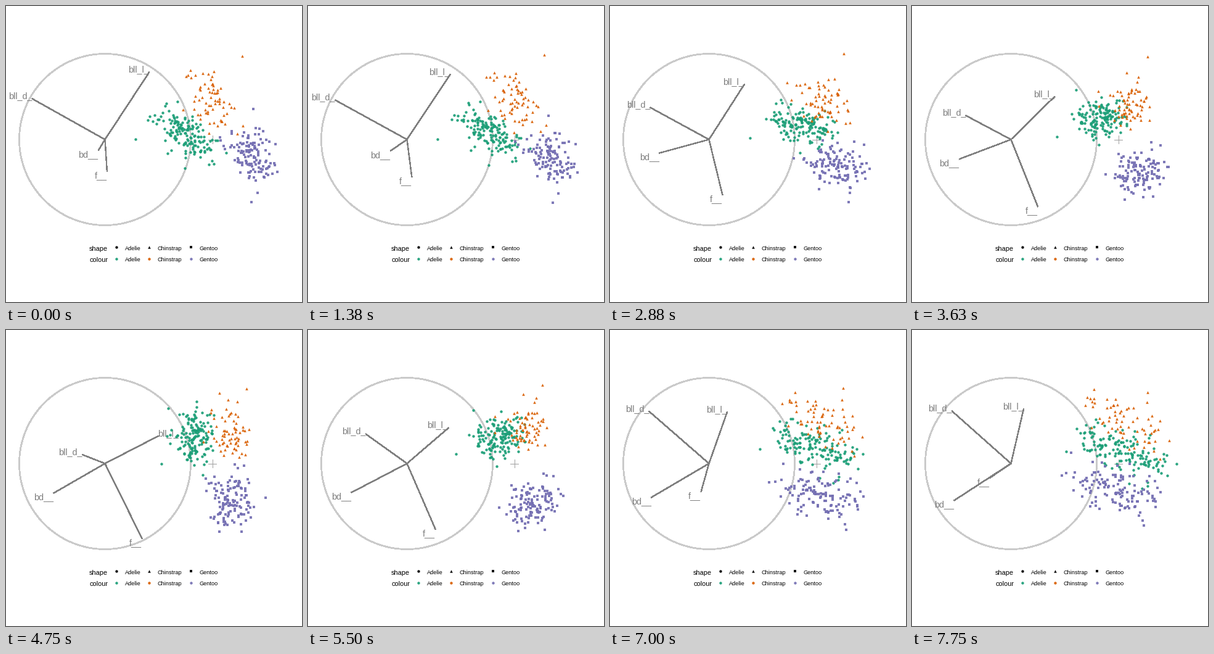
Animation of 480 by 480 pixels, one loop 8000 ms. Source, as a matplotlib script:

```python
import numpy as np
import matplotlib.pyplot as plt
from matplotlib.animation import FuncAnimation

SIZE = 480
INTERVAL = 125
FRAMES = 64
HOLD = 11            # ticks before the tour starts to move
TICKS_PER_STEP = 3

HUB = np.array([160.5, 216.5])
RADIUS = 139
TIP_RADIUS = 138.3
CLOUD = np.array([338.0, 209.2])
CLOUD_SCALE = 221
GREY = "#7f7f7f"

# Variables: bill length, bill depth, flipper length, body mass
LABELS = ["bll_l_", "bll_d_", "f__", "bd__"]
RANGE = np.array([27.5, 8.4, 59, 3600])

# Mean, deviation and one standout bird per species
SPECIES = {
    "Adelie": dict(
        count=151, color="#1b9e77", marker="o", size=4.4,
        mean=[38.8, 18.35, 190, 3700], sd=[2.66, 1.22, 6.5, 459],
        standout=[34.6, 21.1, 198, 4400]),
    "Chinstrap": dict(
        count=68, color="#d95f02", marker="^", size=4.6,
        mean=[48.8, 18.4, 196, 3730], sd=[3.34, 1.14, 7.1, 384],
        standout=[58.0, 17.8, 181, 3700]),
    "Gentoo": dict(
        count=123, color="#7570b3", marker="s", size=4,
        mean=[47.5, 15.0, 217, 5080], sd=[3.08, 0.98, 6.5, 504],
        standout=[59.6, 17.0, 230, 6050]),
}

# Axis tips (right, up) of the planes that the tour visits
PLANES = [
    [[71.5, 108], [-118.5, 66], [3.5, -51], [-10.5, -17]],
    [[57.5, 89], [-94.5, 51], [21.5, -89], [-80, -22]],
    [[86, 44.5], [-36, 14], [59.5, -121], [-83, -48]],
    [[21.5, 88], [-94.5, 85], [-34.5, -23], [-92.5, -59]],
]
LEGS = [(0, .215), (5, .22), (10, .139)]     # first step, share per step


def sample(species, rng):
    """Birds of two sexes: the larger one is larger in every measure."""
    n = species["count"] - 1
    sex = np.where(np.arange(n) % 2, 1, -1)[:, None]
    growth = rng.normal(size=(n, 1))
    traits = .67 * sex + .33 * growth + .66 * rng.normal(size=(n, 4))
    traits = (traits - traits.mean(axis=0)) / traits.std(axis=0)
    birds = np.array(species["mean"]) + traits * species["sd"]
    return np.vstack([birds, species["standout"]]) / RANGE


def orthonormal(tips):
    u, _, vt = np.linalg.svd(np.array(tips, float), full_matrices=False)
    return u @ vt


def geodesic(start, end, share):
    u, cosines, vt = np.linalg.svd(start.T @ end)
    a, z = start @ u, end @ vt.T
    angle = np.arccos(np.clip(cosines, -1, 1))
    side = z - a * cosines
    side /= np.linalg.norm(side, axis=0)
    return (a * np.cos(share * angle) + side * np.sin(share * angle)) @ u.T


BASES = [orthonormal(p) for p in PLANES]


def projection(step):
    leg = max(i for i, (first, _) in enumerate(LEGS) if step >= first)
    first, rate = LEGS[leg]
    return geodesic(BASES[leg], BASES[leg + 1], min(1, rate * (step - first)))


def to_pixels(points, origin, scale):
    return origin + scale * points * [1, -1]


plt.rcParams["font.family"] = "Liberation Sans"
fig = plt.figure(figsize=(SIZE / 72, SIZE / 72), dpi=72, facecolor="white")
ax = fig.add_axes([0, 0, 1, 1])
ax.set(xlim=(0, SIZE), ylim=(SIZE, 0))
ax.axis("off")


def dots(x, y, color, marker="o", size=4.4):
    return ax.plot(x, y, marker, color=color, ms=size, mew=0, alpha=.93,
                   aa=False, zorder=5)[0]


# Guide circle and origin cross
turn = np.linspace(0, 2 * np.pi, 361)
ax.plot(HUB[0] + RADIUS * np.cos(turn), HUB[1] + RADIUS * np.sin(turn),
        color="#cacaca", lw=1.8, aa=False, zorder=1)
ax.plot([328, 341], [216.5, 216.5], color="#a0a0a0", lw=1, zorder=2)
ax.plot([334.5, 334.5], [210, 223], color="#a0a0a0", lw=1, zorder=2)

# Legend
for title, y in (("shape", 393), ("colour", 411)):
    ax.text(135, y + 4, title, size=11, color="black")
    for (name, species), key_x, text_x in zip(
            SPECIES.items(), (178.7, 231.7, 299.5), (193, 246, 314)):
        if title == "shape":
            dots([key_x], [y - 2], "black", species["marker"], species["size"])
        else:
            dots([key_x], [y - 1.5], species["color"])
        ax.text(text_x, y + 3.5, name, size=9.1, color="black")

rng = np.random.default_rng(12)
samples = [sample(s, rng) for s in SPECIES.values()]
center = np.vstack(samples).mean(axis=0)
clouds = [(data - center, dots([], [], s["color"], s["marker"], s["size"]))
          for data, s in zip(samples, SPECIES.values())]
axes = [ax.plot([], [], color=GREY, lw=1.4, aa=False, zorder=3)[0] for _ in LABELS]
names = [ax.text(0, 0, label, size=14.4, color=GREY, zorder=4) for label in LABELS]


def draw(frame):
    step = 0 if frame < HOLD else (frame - HOLD) // TICKS_PER_STEP + 1
    basis = projection(step)
    for (x, y), line, name in zip(to_pixels(basis, HUB, TIP_RADIUS), axes, names):
        line.set_data([HUB[0], x], [HUB[1], y])
        # labels point away from the middle of the panel
        name.set_ha("right" if x < SIZE / 2 else "left")
        name.set_position((x - .5, y - .5 if y < HUB[1] else y + 11))
    for data, artist in clouds:
        artist.set_data(*to_pixels(data @ basis, CLOUD, CLOUD_SCALE).T)
    return axes + names + [artist for _, artist in clouds]


anim = FuncAnimation(fig, draw, frames=FRAMES, interval=INTERVAL,
                     repeat=True, repeat_delay=0)
plt.show()
```
